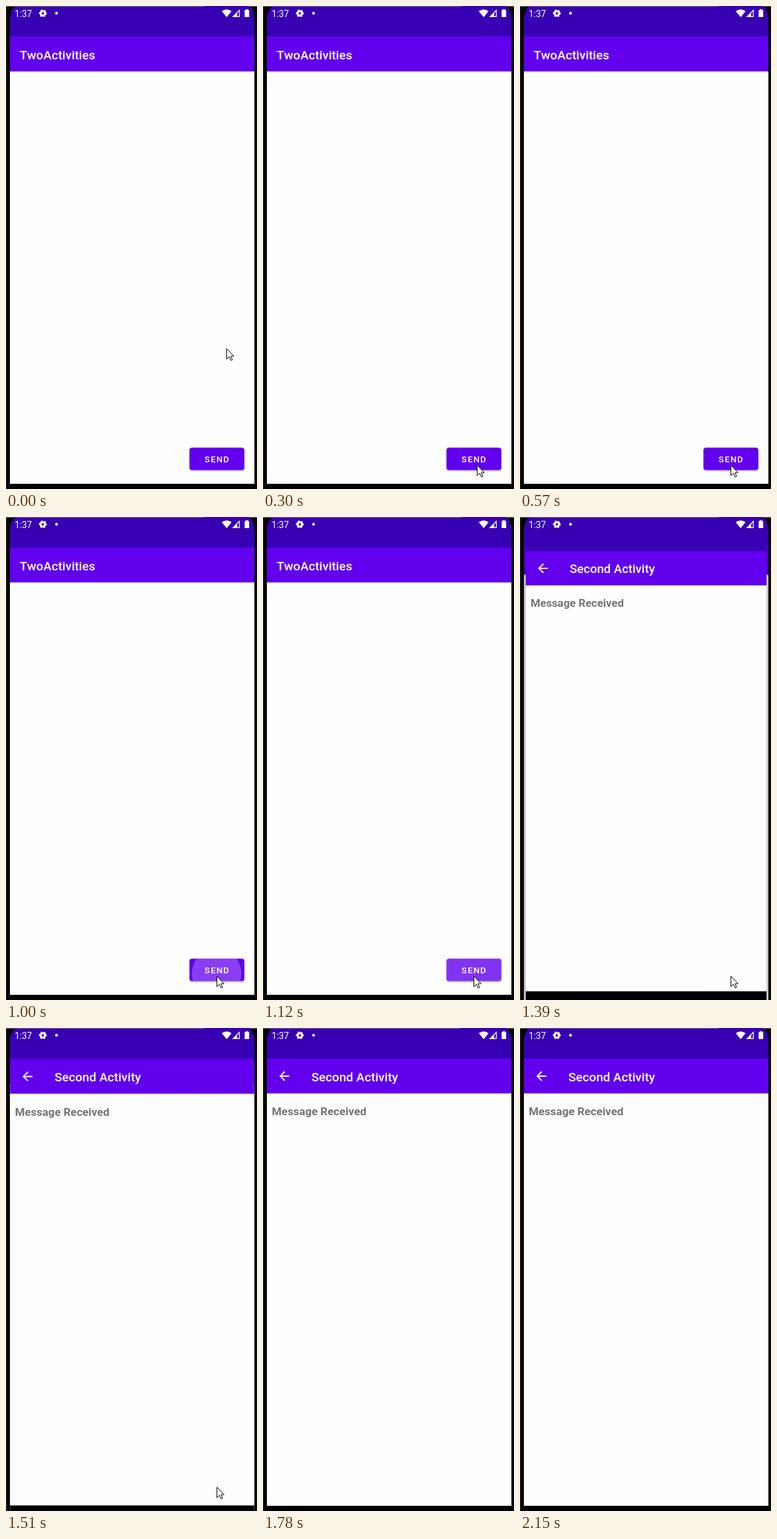
An HTML page that plays this animation: 385x742 px, repeating every 2.52 s.

```html
<!DOCTYPE html>
<html lang="en">
<head>
<meta charset="utf-8">
<title>Two activities</title>
<style>
html, body { margin: 0; width: 100%; height: 100%; overflow: hidden; background: #000; }
svg { display: block; width: 385px; height: 742px; font-family: Roboto, sans-serif; }
.title { font-size: 19.1px; font-weight: 500; fill: #fff; }
.label { font-size: 13.4px; font-weight: 500; letter-spacing: 1.2px; fill: #fff; }
.message { font-size: 17.2px; font-weight: 700; fill: #757575; }
.clock { font-size: 13.8px; fill: #fff; }
</style>
</head>
<body>
<svg viewBox="0 0 385 742">
  <defs>
    <clipPath id="screen"><path d="M6 742V20Q7 6 15 0H372Q380 6 381 20V742Z"/></clipPath>
    <clipPath id="buttonClip"><rect x="281.5" y="678.5" width="84" height="34.3" rx="3.8"/></clipPath>
    <filter id="shadow" x="-10%" y="-20%" width="120%" height="150%">
      <feDropShadow dx="0" dy="1.3" stdDeviation="1" flood-opacity=".4"/>
    </filter>
    <linearGradient id="barShadow" x2="0" y2="1">
      <stop stop-color="#000" stop-opacity=".26"/>
      <stop offset="1" stop-color="#000" stop-opacity="0"/>
    </linearGradient>
    <g id="window">
      <rect x="6" y="-40" width="375" height="88" fill="#3700b3"/>
      <rect x="6" y="100" width="375" height="634" fill="#fefefe"/>
      <rect x="6" y="47" width="375" height="53.3" fill="#6200ee"/>
      <rect x="6" y="100.3" width="375" height="2" fill="url(#barShadow)"/>
      <rect x="6" y="734" width="375" height="50"/>
    </g>
  </defs>

  <rect width="385" height="742" fill="#040606"/>
  <path d="M.5 0V742" stroke="#24282a"/>
  <path d="M0 .5H304M309 .5H314M322 .5H385" stroke="#6c6c72"/>

  <g clip-path="url(#screen)">
    <g id="first">
      <use href="#window"/>
      <text class="title" x="21" y="81.7">TwoActivities</text>
      <rect x="281.5" y="678.5" width="84" height="34.3" rx="3.8" fill="#6200ee" filter="url(#shadow)"/>
      <circle id="ripple" cx="323" cy="701" fill="#fff" clip-path="url(#buttonClip)"/>
      <text class="label" x="304.6" y="700.6">SEND</text>
    </g>
    <rect id="dim" x="6" width="375" height="742"/>
    <g id="second">
      <use href="#window"/>
      <path transform="translate(21.3 62.5) scale(.955)" fill="#fff"
        d="M20 11H7.83l5.59-5.59L12 4l-8 8 8 8 1.41-1.41L7.83 13H20z"/>
      <text class="title" x="74.3" y="81.7">Second Activity</text>
      <text class="message" x="13.4" y="134.3">Message Received</text>
    </g>
    <rect x="6" width="375" height="44" fill="#3700b3"/>
    <path d="M6 .5H304" stroke="#6c6c72"/>
  </g>

  <g fill="#fff">
    <text class="clock" x="13.2" y="16.6">1:37</text>
    <g transform="translate(56.5 11.3)" fill="none" stroke="#fff">
      <circle r="3.4" stroke-width="3"/>
      <circle r="5.1" stroke-width="1.8" stroke-dasharray="2.8 2.54" transform="rotate(-15)"/>
    </g>
    <circle cx="77.5" cy="11.2" r="2.1"/>
    <path d="M338.5 17.2L331 8.1Q338.5 2.3 346 8.1Z"/>
    <path d="M358.5 5V17H346.8ZM357.2 8.2L354.5 11V15.8H357.2Z" fill-rule="evenodd"/>
    <path d="M367.8 5H371.2V6.2H373V17H366V6.2H367.8Z"/>
  </g>

  <path id="cursor" d="M.5 .5V16.5L4.3 12.8 7 18.5 9.3 17.5 6.7 12H11.5Z" fill="#fff" stroke="#000"/>
</svg>
<script>
const LOOP = 2520;
const $ = id => document.getElementById(id);

// [start, cursor x, cursor y]; no position hides the pointer
const pointer = [
  [0, 338, 526], [150, 330, 698], [300, 328, 705], [450, 325, 705],
  [570, 323, 705], [1780], [2030, 77, 597], [2150]
];
// [start, radius, opacity]
const ripple = [[0, 0, 0], [1000, 38, .24], [1120, 60, .2], [1270, 60, .085], [1390, 0, 0]];
// [start, first scale, second scale, dim]; second scale 0 keeps it closed
const windows = [
  [0, 1, 0, 0], [1270, 1.0036, 0, 0], [1390, 1.041, .9845, .22],
  [1510, 1.05, .9985, .22], [1630, 1.05, 1, 0]
];

const at = (steps, t) => steps.findLast(s => s[0] <= t);
const zoom = (el, s) =>
  el.setAttribute("transform", `translate(193.5 390) scale(${s}) translate(-193.5 -390)`);
const show = (el, on) => el.setAttribute("visibility", on ? "visible" : "hidden");

function draw(t) {
  const [, x, y] = at(pointer, t);
  show($("cursor"), x !== undefined);
  if (x !== undefined) $("cursor").setAttribute("transform", `translate(${x} ${y})`);

  const [, radius, opacity] = at(ripple, t);
  $("ripple").setAttribute("r", radius);
  $("ripple").setAttribute("opacity", opacity);

  const [, first, second, dim] = at(windows, t);
  zoom($("first"), first);
  zoom($("second"), second || 1);
  show($("second"), second);
  $("dim").setAttribute("opacity", dim);
}

const start = performance.now();
function tick() {
  draw((performance.now() - start) % LOOP);
  requestAnimationFrame(tick);
}
tick();
</script>
</body>
</html>
```
